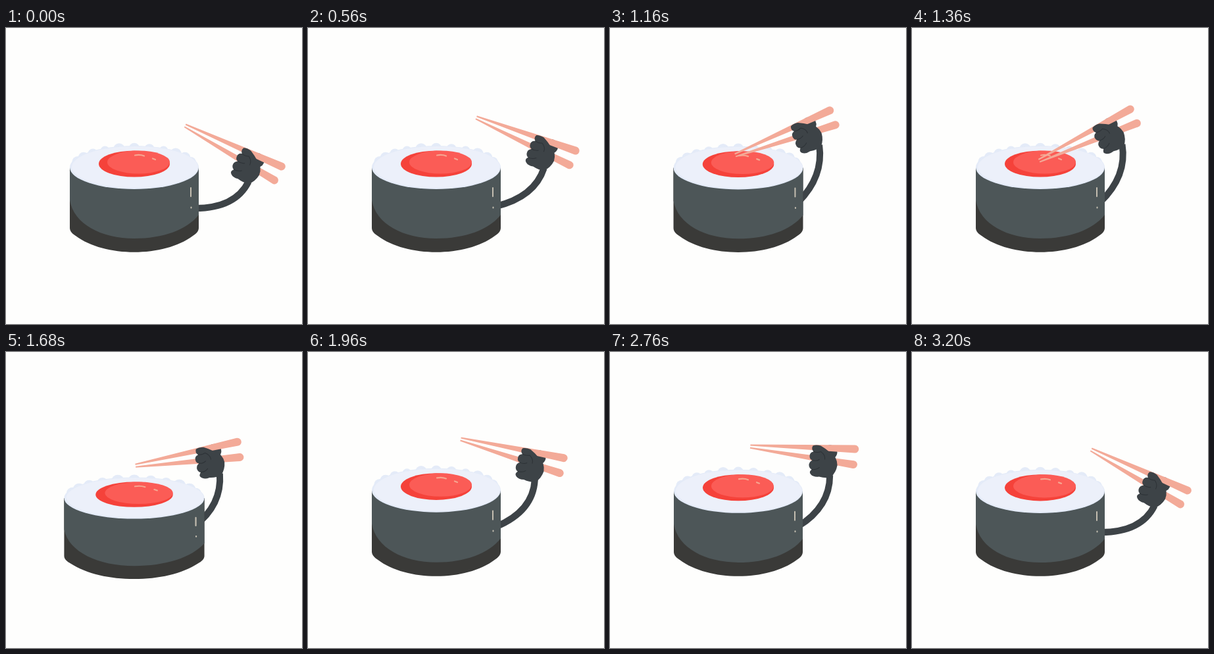
An HTML page that plays this animation: 450x450 px, repeating every 3.24 s.

```html
<!DOCTYPE html>
<html>
<head>
<meta charset="utf-8">
<style>
html, body { margin: 0; width: 100%; height: 100%; overflow: hidden; background: #fefefd; }
svg { display: block; width: 100vw; height: 100vh; }
.nori { fill: #3d4347; }
.stick { fill: #f3aa98; }
</style>
</head>
<body>
<svg viewBox="0 0 450 450">
  <defs>
    <path id="taper" d="M-100 -1L59 -6A6 6 0 0 1 59 6L-100 1Z"/>
  </defs>
  <path id="arm" fill="none" stroke="#3d4347" stroke-width="10"/>
  <g id="roll">
    <path fill="#3a3a38" d="M97 212V304C97 309 101 313 106 316C150 349 240 349 284 316C289 313 293 309 293 304V212Z"/>
    <path fill="#4d5658" d="M97 212V262C103 298 145 320 195 320C238 320 275 307 293 284V212Z"/>
    <g id="rice" fill="#e4ebf8"></g>
    <ellipse cx="195" cy="212" rx="98" ry="33" fill="#e4ebf8"/>
    <ellipse cx="196" cy="211.500" rx="96" ry="31.500" fill="#ecf0fa"/>
    <ellipse cx="195" cy="206.500" rx="54" ry="20" fill="#f5423a"/>
    <ellipse cx="201.500" cy="204" rx="47.500" ry="17.500" fill="#fb5c56"/>
    <path d="M196 193.500Q204 192 210 194.500M223 198.500L227 200" fill="none" stroke="#f6a590" stroke-width="2.200" stroke-linecap="round"/>
    <path d="M281 243V256M281.500 272.500V273.500" stroke="#c3bdb0" stroke-width="2" stroke-linecap="round"/>
  </g>
  <g id="back"><circle class="nori" cx="22" cy="-1" r="11"/></g>
  <use id="lower" class="stick" href="#taper"/>
  <use id="upper" class="stick" href="#taper"/>
  <g id="front">
    <g transform="translate(-315 -153)">
      <path class="nori" d="M311 142Q308 147 312 151Q306 152 306 158Q306 163 310 164Q304 167 305 173Q306 177 309 178Q304 182 308 186Q312 190 320 189Q330 192 338 190Q346 183 348 172Q348 159 338 153Q330 146 323 142Q316 140 311 142Z"/>
      <path fill="none" stroke="#2d3236" d="M312 151Q318 153 323 151M310 164Q316 166 321 163M309 178Q316 179 321 175M323 151Q330 156 329 163"/>
    </g>
  </g>
</svg>
<script>
const LOOP = 3240, STEP = 40, REST = 6, { PI, sin, cos, exp, max, min } = Math;
const el = id => document.getElementById(id);
const span = (t, from, to) => min(1, max(0, (t - from) / (to - from)));
const smooth = u => u * u * (3 - 2 * u);
const easeOut = u => 1 - (1 - u) ** 3;
const bump = u => sin(PI * u);

function turn(x, y, deg) {
  const r = deg * PI / 180, c = cos(r), s = sin(r);
  return [x * c - y * s, x * s + y * c];
}

const place = (id, x, y, deg) =>
  el(id).setAttribute('transform', `translate(${x} ${y}) rotate(${deg})`);

for (let deg = 180; deg <= 360; deg += 15) {
  const [x, y] = turn(1, 0, deg);
  el('rice').innerHTML += `<circle cx="${195 + 89 * x}" cy="${211 + 28 * y}" r="${7.2 + deg % 4 * 0.5}"/>`;
}

// Arm swing: 1 stretched out, 0 hovering, -1 over the filling.
const swing = t => 1
  + 0.1 * bump(span(t, 40, 480))
  - 2 * smooth(span(t, 500, 780))
  + easeOut(span(t, 1640, 1880)) + 0.38 * bump(span(t, 1640, 2280))
  + easeOut(span(t, 2760, 3100)) + 0.06 * bump(span(t, 2880, 3200));

// Each poke flattens the roll more; on release it wobbles like jelly.
function squash(t, contact) {
  const poke = contact * sin(PI * (t - 920) / 220) ** 2 * (t - 600) / 800;
  const free = max(0, t - 1640);
  return poke + 0.6 * exp(-free / 500) * sin(2 * PI * free / 427);
}

function draw(t) {
  const p = swing(t), contact = max(0, -p);
  const jab = 2.9 * contact * cos(3 * PI * (t - 920) / 440);
  const x = 312.5 + 38.75 * p + 9.75 * p * p;
  const y = 153.5 + (22.5 + 18 * p) * p * p - 0.4 * jab;
  const a = 5.7 + 24.75 * p - 3.25 * p * p + jab;

  const s = squash(t, contact), wide = max(0, s);
  el('roll').setAttribute('transform',
    `translate(195 ${340 + 4.5 * wide}) scale(${1 + 0.09 * wide} ${1 - 0.045 * s}) translate(-195 -340)`);

  const clack = t > 2120 && t < 2760 ? cos(PI * (t - 2120) / 320) ** 2 : 1;
  const grip = 3.5 * clack, [ox, oy] = turn(0, 8.2, a);
  place('upper', x - ox, y - oy, a - grip);
  place('lower', x + ox, y + oy, a + grip);
  place('back', x, y, a - REST);
  place('front', x, y, a - REST);

  // The shoulder drops as the arm reaches outward.
  const reach = span(a, 14, 27);
  const [dx, dy] = turn(21.5, 34, a - REST), wx = x + dx, wy = y + dy;
  const cx = wx - 0.25 * (a - REST) - 15 * reach, cy = wy + 48 - 7 * reach;
  el('arm').setAttribute('d', `M286 ${265 + 9 * reach}Q${cx} ${cy} ${wx} ${wy}`);
}

function tick() {
  draw(Math.floor(performance.now() % LOOP / STEP) * STEP);
  requestAnimationFrame(tick);
}
tick();
</script>
</body>
</html>
```
